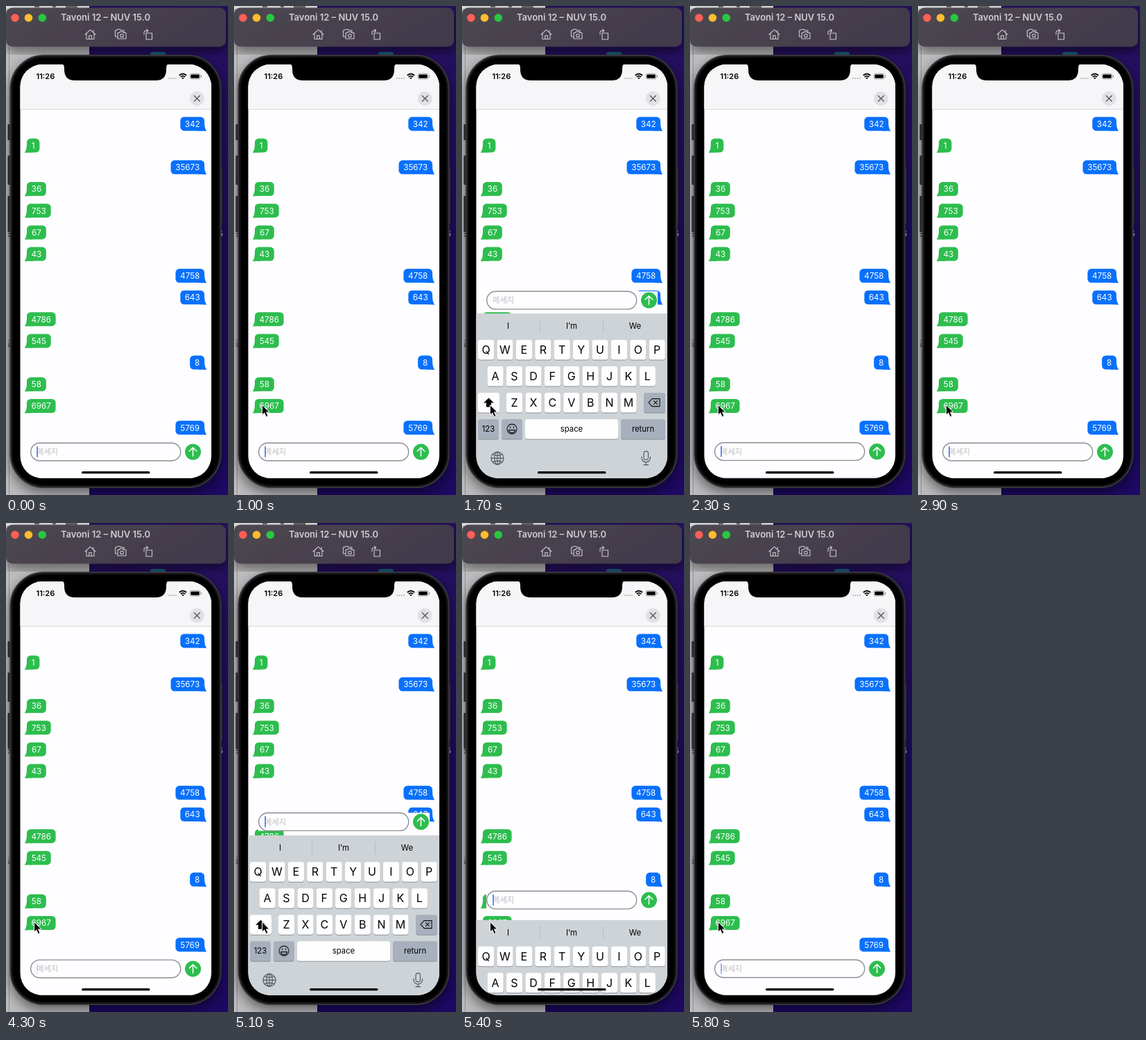
An HTML page for the animation above (5.9 s loop, 320x703 px).

```html
<!DOCTYPE html>
<html lang="ko">
<head>
<meta charset="utf-8">
<title>Chat keyboard</title>
<style>
  html, body { margin: 0; width: 100%; height: 100%; overflow: hidden; background: #1d0b5b; }
  svg { display: block; width: 320px; height: 703px; font-family: Inter, "Noto Sans CJK KR", "Noto Sans CJK", sans-serif; }
  .line { fill: none; stroke-linecap: round; stroke-linejoin: round; }
</style>
</head>
<body>
<svg viewBox="0 0 320 703">
  <defs>
    <clipPath id="screen"><rect x="20.500" y="84" width="275.500" height="595" rx="32"/></clipPath>
    <linearGradient id="desk" x2="0" y2="1">
      <stop offset="0" stop-color="#26105f"/><stop offset=".5" stop-color="#1c0a5c"/><stop offset="1" stop-color="#1d0863"/>
    </linearGradient>
    <linearGradient id="bar" x2="1" y2=".3">
      <stop offset="0" stop-color="#4d4850"/><stop offset="1" stop-color="#423a4b"/>
    </linearGradient>
    <filter id="shadow" x="-20%" y="-20%" width="140%" height="140%">
      <feDropShadow dx="0" dy="7" stdDeviation="9" flood-color="#000" flood-opacity=".5"/>
    </filter>
  </defs>

  <!-- desktop -->
  <rect width="320" height="703" fill="url(#desk)"/>
  <rect width="120" height="703" fill="#bdbdbf"/>
  <rect width="120" height="4" fill="#e4e4e5"/>
  <path d="M41 1h7M67 1h5M86 1h17M86 3h17" stroke="#444" stroke-width="1.5"/>
  <path d="M4.5 58V703" stroke="#909092"/>
  <rect x="208" y="66" width="22" height="12" rx="3" fill="#1d6580"/>
  <g font-size="10">
    <text x="2" y="331" fill="#222">글</text>
    <text x="2" y="489" fill="#222">금</text>
    <text x="307" y="331" fill="#ddd">5</text>
  </g>

  <!-- window bar -->
  <rect y="2.5" width="317" height="56" rx="9" fill="url(#bar)" filter="url(#shadow)"/>
  <circle cx="13" cy="17" r="5.800" fill="#fe5f57"/>
  <circle cx="32.500" cy="17" r="5.800" fill="#febc2e"/>
  <circle cx="52.300" cy="17" r="5.800" fill="#28c840"/>
  <text x="143.500" y="21" font-size="13" font-weight="600" fill="#cfcbd1" text-anchor="middle">Tavoni 12 – NUV 15.0</text>
  <g class="line" stroke="#cbc7cd" stroke-width="1.1">
    <path d="M114 41l7.500-6.800 7.500 6.800M116 40v7.500h11v-7.500M119.700 47.500v-5h3.600v5M126 37.500v-2.500"/>
    <path d="M160 44h-2.500v-9h2l1-1.500h4l1 1.500h4.500v2M161 38.500h2l1.500-1.500h4l1.500 1.500h3v8.500h-12z"/>
    <circle cx="167" cy="42.500" r="2.300"/>
    <path d="M202 39h8.500v9h-8.500zM199 41v-3q0-2.500 3-2.500h2.500M202.500 33.300l2.200 2.200-2.200 2.200"/>
  </g>

  <!-- phone body -->
  <g fill="#343337">
    <rect x="2.500" y="170" width="6" height="23" rx="1"/>
    <rect x="2.500" y="215" width="6" height="42" rx="1"/>
    <rect x="2.500" y="273" width="6" height="52" rx="1"/>
    <rect x="307" y="231" width="5" height="82" rx="1"/>
  </g>
  <rect x="6.500" y="71" width="303" height="621" rx="48" fill="#09090a" stroke="#37363b" stroke-width="2" filter="url(#shadow)"/>
  <rect x="9" y="73.500" width="298" height="616" rx="45" fill="#000" stroke="#1b1b1d"/>

  <g clip-path="url(#screen)">
    <rect x="20" y="84" width="277" height="596" fill="#fefdff"/>
    <rect x="20" y="84" width="277" height="64" fill="#f6f5f7"/>
    <path d="M20 148.500H297" stroke="#d9d8db"/>
    <circle cx="275.300" cy="133" r="10.500" fill="#e2e1e5"/>
    <path d="M271.300 129l8 8m0-8l-8 8" class="line" stroke="#636368" stroke-width="1.600"/>
    <g id="chat" font-size="11.700" fill="#fff" text-anchor="middle"></g>
    <g id="input">
      <rect x="35" y="628" width="247" height="26" fill="#fefdff"/>
      <rect x="35.700" y="628.200" width="216" height="25.600" rx="12.800" fill="#fefdff" stroke="#8e8e93" stroke-width="1.400"/>
      <text x="44" y="645" font-size="11.300" fill="#bdbdc1">메세지</text>
      <rect id="caret" x="44.300" y="633" width="1.500" height="16" rx=".7" fill="#2f6bea"/>
      <circle cx="269.500" cy="641" r="11.500" fill="#2dbd4e"/>
      <path d="M269.500 647v-12M264.300 640l5.200-5.200 5.200 5.200" class="line" stroke="#fff" stroke-width="1.500"/>
    </g>
    <g id="keyboard" text-anchor="middle" fill="#000">
      <rect x="20" y="442" width="277" height="260" fill="#ced3d7"/>
      <path d="M112.500 451v18M203.500 451v18" stroke="#b9bec3"/>
      <g font-size="11.500">
        <text x="66.500" y="464">I</text><text x="158" y="464">I’m</text><text x="249.500" y="464">We</text>
      </g>
      <g id="keys"></g>
      <path d="M38.500 563.500l7.300 7h-3.800v6h-7v-6h-3.800z"/>
      <g class="line" stroke="#111" stroke-width="1.100">
        <path d="M269 570l5-5.500h11v11h-11zM276.500 567.500l5 5m0-5l-5 5"/>
        <circle cx="72" cy="608" r="7"/>
        <path d="M67.500 609.500h9q-.8 4-4.500 4t-4.500-4zM69.500 605v1.500M74.500 605v1.500"/>
      </g>
      <g class="line" stroke="#50555a" stroke-width="1.100">
        <circle cx="51" cy="650" r="9"/>
        <ellipse cx="51" cy="650" rx="4.300" ry="9"/>
        <path d="M51 641v18M42 650h18M44 644.500q7 3.500 14 0M44 655.500q7-3.500 14 0"/>
        <rect x="262" y="640" width="6.500" height="12.500" rx="3.250"/>
        <path d="M259 648v1.500a6.200 6.200 0 0 0 12.500 0v-1.500M265.300 656v3.500M262 659.500h6.600"/>
      </g>
    </g>
    <rect x="109" y="669" width="98.500" height="3.300" rx="1.650"/>
  </g>

  <!-- notch and status -->
  <path d="M79 83q5 0 5 6v2q0 16 15 16h117q15 0 15-16v-2q0-6 5-6z"/>
  <text x="43.500" y="105" font-size="11" font-weight="600">11:26</text>
  <g fill="#b5b5b8">
    <circle cx="235" cy="104" r="1.100"/><circle cx="238.300" cy="104" r="1.100"/>
    <circle cx="241.600" cy="104" r="1.100"/><circle cx="244.900" cy="104" r="1.100"/>
  </g>
  <path d="M249.800 99.800q5.200-4.500 10.400 0M251.800 102q3.200-2.700 6.400 0" fill="none" stroke="#000" stroke-width="1.800"/>
  <path d="M253.200 103.300q1.800-1.300 3.600 0l-1.800 2z"/>
  <rect x="265" y="97.200" width="15" height="7.800" rx="2.400" fill="none" stroke="#8e8e90" stroke-width=".8"/>
  <rect x="266.300" y="98.500" width="12.400" height="5.200" rx="1.300"/>
  <path d="M281.500 99.700v3" stroke="#8e8e90"/>

  <path id="pointer" d="M0 0v14.500l3.300-3.100 2.500 5.800 2.700-1.200-2.500-5.600h4.500z" stroke="#fff" stroke-width="1"/>
</svg>
<script>
const LOOP = 5900, STEP = 100;
const $ = id => document.getElementById(id);

// Negative numbers are sent, positive ones received.
const messages = [-342, 1, -35673, 36, 753, 67, 43, -4758, -643, 4786, 545, -8, 58, 6967, -5769];
$('chat').innerHTML = messages.map((m, i) => {
  const sent = m < 0, text = String(Math.abs(m));
  const w = 14 + 6.9 * text.length - (text === '1' ? 2.5 : 0);
  const x = sent ? 286 - w : 30, y = 159.4 + 31.2 * i;
  const edge = sent ? 286 : 30, out = sent ? 1 : -1;
  const tail = `M${edge} ${y + 8}Q${edge} ${y + 16} ${edge + 3.2 * out} ${y + 20.4}L${edge - 9 * out} ${y + 20}z`;
  return `<g fill="${sent ? '#0870fb' : '#2dbd4e'}"><rect x="${x}" y="${y}" width="${w}" height="20" rx="5.500"/>
    <path d="${tail}"/></g><text x="${x + w / 2}" y="${y + 14.3}">${text}</text>`;
}).join('');

function key(x, y, w, label = '', size = 16, fill = '#fefeff') {
  return `<rect x="${x}" y="${y + 1}" width="${w}" height="28.500" rx="3.600" fill="#8d9196"/>
    <rect x="${x}" y="${y}" width="${w}" height="28.500" rx="3.600" fill="${fill}"/>
    <text x="${x + w / 2}" y="${y + 14.2 + size * .364}" font-size="${size}">${label}</text>`;
}
const row = (letters, x, y) => [...letters].map((c, i) => key(x + 27.4 * i, y, 23.2, c)).join('');
const GREY = '#a7b0bc';
$('keys').innerHTML =
  row('QWERTYUIOP', 23, 480) + row('ASDFGHJKL', 36.5, 518) + row('ZXCVBNM', 64, 556) +
  key(23, 556, 31) + key(262, 556, 31, '', 16, GREY) +
  key(23, 594, 30, '123', 11.3, GREY) + key(57, 594, 30, '', 16, GREY) +
  key(91, 594, 134, 'space', 11.3) + key(229, 594, 64, 'return', 11.3, GREY);

// The keyboard flips between hidden and shown at these times.
const toggles = [1140, 1840, 2940, 3760, 4808, 5300];

function lift(t) {
  const n = toggles.filter(s => s <= t).length;
  if (!n) return 0;
  const u = (t - toggles[n - 1]) * .0183;
  const left = (1 + u) * Math.exp(-u);
  return n % 2 ? 1 - left : left;
}

// Each flip restarts the caret blink.
function caretAlpha(t) {
  const p = (t - (toggles.filter(s => s <= t).pop() || 0)) % 1000;
  return p < 700 ? Math.max(0, Math.min(1, (560 - p) / 100)) : Math.max(0, (p - 900) / 100);
}

const move = (id, x, y) => $(id).setAttribute('transform', `translate(${x} ${y})`);

function draw() {
  const t = Math.floor(performance.now() % LOOP / STEP) * STEP;
  const up = lift(t);
  move('input', 0, -218 * up);
  move('keyboard', 0, 236 * (1 - up));
  $('caret').setAttribute('opacity', caretAlpha(t));
  const away = Math.max(0, Math.min(1, (1000 - t) / 400)) ** 2;
  move('pointer', 40.5 + 25 * away, 573.5 + 135 * away);
  requestAnimationFrame(draw);
}
draw();
</script>
</body>
</html>
```
